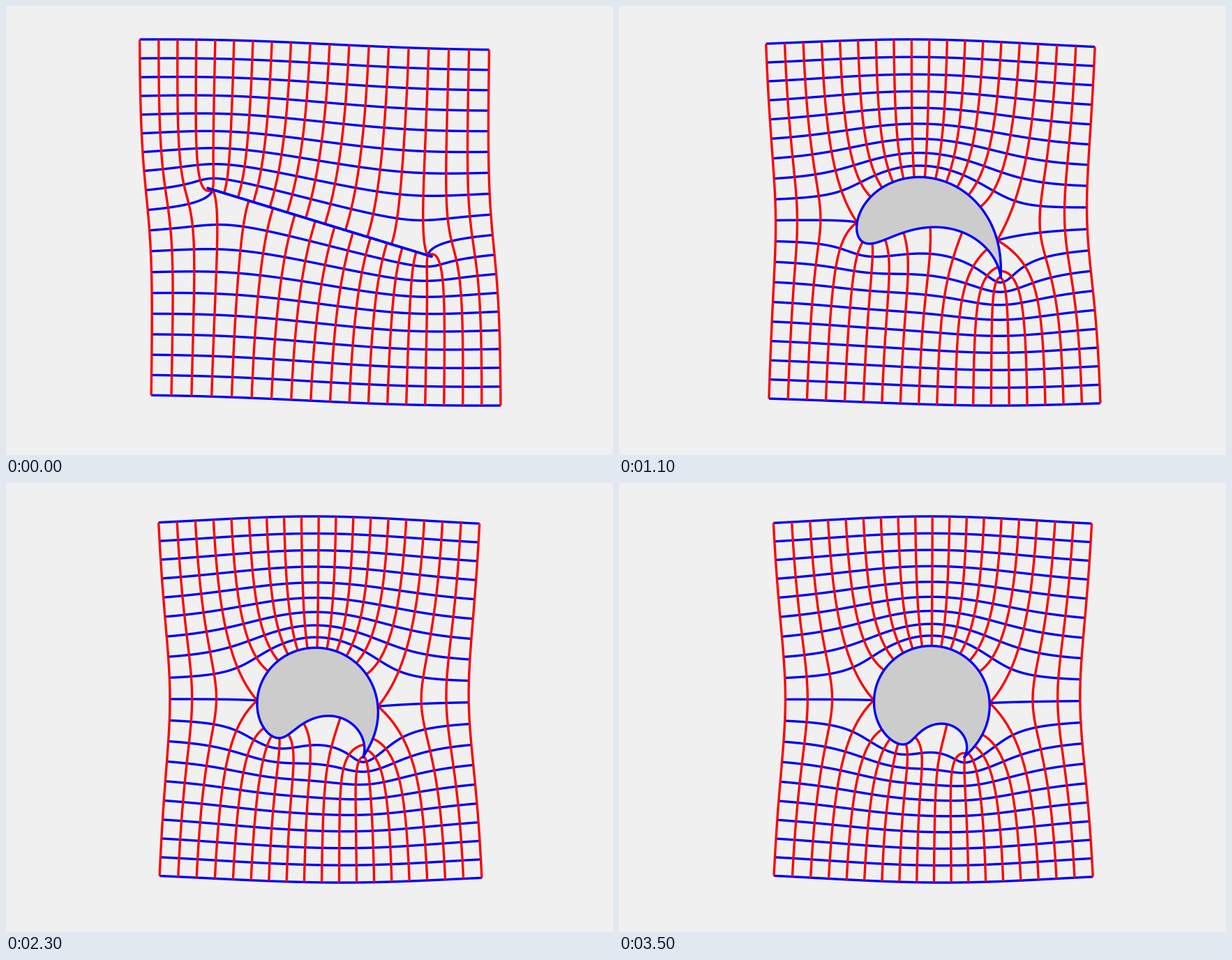
These frames come from a looping animation (870 by 644 pixels, 3600 ms). A matplotlib script:

```python
import numpy as np
import matplotlib.pyplot as plt
from matplotlib.animation import FuncAnimation
from matplotlib.collections import LineCollection

W, H, DPI = 870, 644, 64     # a power of two keeps the pixel size exact
FRAMES, INTERVAL = 36, 100
CENTER = 450.3, 310.5        # middle of the net on the stage
HALF_HEIGHT = 262.6
TILT = np.exp(-1j * np.radians(17))
EXTENT, STEPS = 3, 9         # net size in circle radii, cells per half side
LINE = 3.4 * 72 / DPI

levels = np.arange(-STEPS, STEPS + 1) * EXTENT / STEPS
span = np.linspace(-EXTENT, EXTENT, 401)
ease = np.linspace(0, 1, 201) ** 2


def around_circle(w):
    """Invert w = s + 1/s onto the outside of the unit circle."""
    return (w + np.sqrt(w - 2) * np.sqrt(w + 2)) / 2


# Streamlines; the middle one stops at the two stagnation points.
streams = [around_circle(span + 1j * v) for v in levels if abs(v) > 1e-9]
ray = around_circle(2 + (EXTENT - 2) * ease + 0j)
streams += [ray, -ray]

# Equipotentials, upper and lower halves.
potentials = []
for u in levels:
    upper = around_circle(u + 1j * (EXTENT * ease + 1e-12))
    potentials += [upper, upper.conj()]


def joukowski(s, mu):
    """Map the plane outside the unit circle to the plane around the airfoil."""
    radius = abs(1 - mu)
    zeta = s + mu / radius * TILT
    return zeta + (TILT / radius) ** 2 / zeta


def airfoil(mu):
    cusp = np.angle((1 - mu) * TILT)
    return joukowski(np.exp(1j * (cusp + np.linspace(0, 2 * np.pi, 721))), mu)


fig = plt.figure(figsize=(W / DPI, H / DPI), dpi=DPI, facecolor="#f0f0f0")
ax = fig.add_axes([0, 0, 1, 1])
ax.set_xlim(0, W)
ax.set_ylim(H, 0)
ax.axis("off")

blue = LineCollection([], colors="#0000ff", linewidths=LINE, zorder=1)
red = LineCollection([], colors="#ff0000", linewidths=LINE, zorder=2)
for lines in (blue, red):
    ax.add_collection(lines, autolim=False)
body, = ax.fill([0, 1, 1], [0, 0, 1], color="#cccccc", lw=0, zorder=3)
outline, = ax.plot([], [], color="#0000ff", lw=LINE, zorder=4,
                   solid_capstyle="butt", solid_joinstyle="round")


def update(i):
    mu = (-1 + 3j) * i / (FRAMES - 1)
    rows = [joukowski(s, mu) for s in streams]
    cols = [joukowski(s, mu) for s in potentials]

    # Fit the net to a constant height and keep it centred.
    net = np.concatenate(rows + cols)
    x0, x1 = net.real.min(), net.real.max()
    y0, y1 = net.imag.min(), net.imag.max()
    scale = 2 * HALF_HEIGHT / (y1 - y0)

    def to_stage(z):
        return np.column_stack([CENTER[0] + scale * (z.real - (x0 + x1) / 2),
                                CENTER[1] - scale * (z.imag - (y0 + y1) / 2)])

    blue.set_segments([to_stage(z) for z in rows])
    red.set_segments([to_stage(z) for z in cols])
    shape = to_stage(airfoil(mu))
    body.set_xy(shape)
    outline.set_data(shape[:, 0], shape[:, 1])
    return blue, red, body, outline


anim = FuncAnimation(fig, update, frames=FRAMES, interval=INTERVAL,
                     repeat=True, repeat_delay=0)
plt.show()
```
